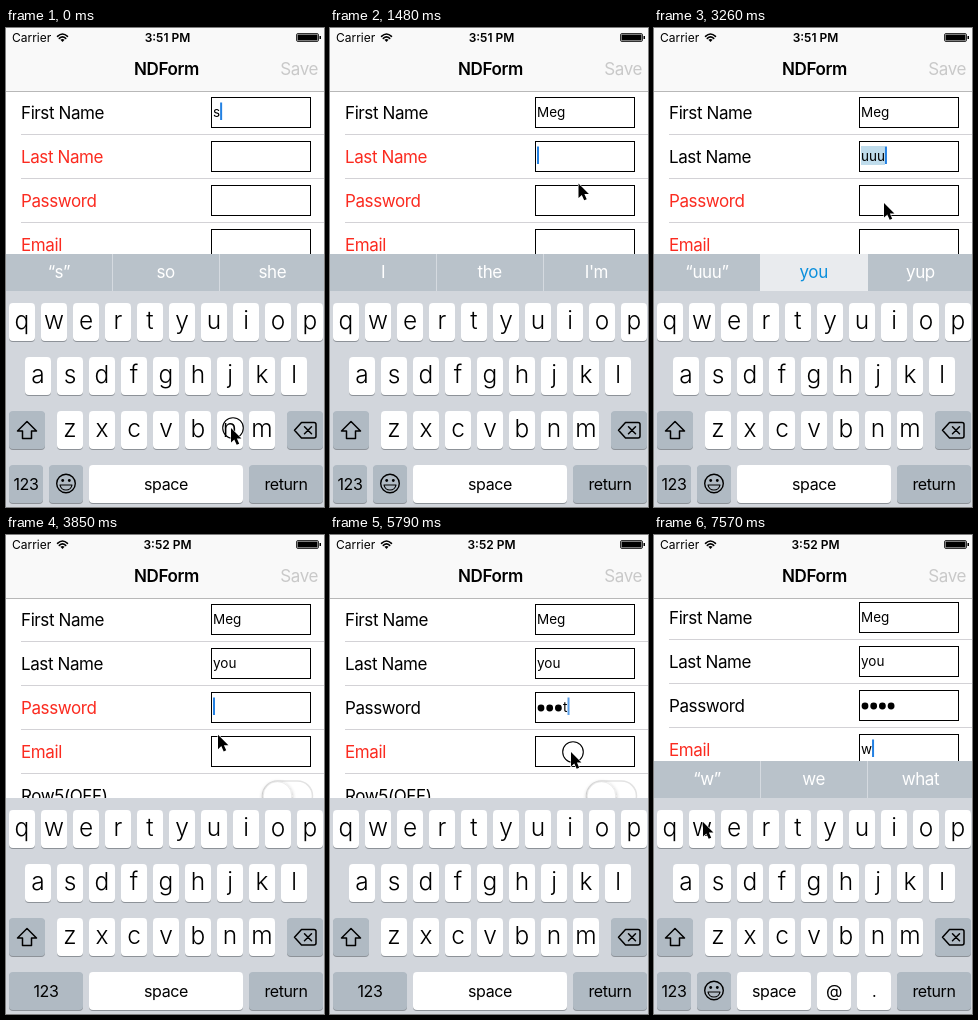
Write an HTML page that moves like this. It is 318x479 px and loops after 8000 ms.

```html
<!DOCTYPE html>
<html lang="en">
<head>
<meta charset="utf-8">
<title>Form demo</title>
<style>
  html, body { margin: 0; width: 100%; height: 100%; overflow: hidden; background: #fff; }
  svg { display: block; width: 318px; height: 479px; }
  text { font-family: Inter, Roboto, sans-serif; font-size: 17px; letter-spacing: -.4px; white-space: pre; }
  .mid { text-anchor: middle; }
  .status { font-size: 12px; letter-spacing: 0; }
  .bold { font-weight: 600; }
  .value { font-size: 13.5px; letter-spacing: 0; }
  .letter { font-size: 24.5px; font-weight: 300; letter-spacing: 0; }
  .big { font-size: 38px; font-weight: 300; letter-spacing: 0; }
  .word { font-size: 16px; }
  .line { fill: none; stroke: #000; stroke-linecap: round; stroke-linejoin: round; }
</style>
</head>
<body>
<svg id="stage" viewBox="0 0 318 479" xmlns="http://www.w3.org/2000/svg">
  <defs>
    <filter id="lift" x="-30%" y="-20%" width="160%" height="150%">
      <feDropShadow dx="0" dy="1.5" stdDeviation="2" flood-color="#000" flood-opacity=".38"/>
    </filter>
  </defs>
  <rect width="318" height="479" fill="#fff"/>
  <g id="table"></g>
  <g id="header"></g>
  <g id="bar"></g>
  <g id="keys"></g>
  <g id="overlay"></g>
</svg>
<script>
const LOOP = 8000, TICK = 148.4, LEAD = 12;   // the screen refreshes once per tick
const ROW = 44, KEY_W = 26, KEY_H = 38, KEYS_TOP = 263;
const LABELS = ['First Name', 'Last Name', 'Password', 'Email'];
const LETTER_ROWS = ['qwertyuiop', 'asdfghjkl', 'zxcvbnm'];
const layer = id => document.getElementById(id);

// [tick, field, text]: the latest entry also owns the focus
const edits = [
  [0, 0, 's'], [1, 0, 'sn'], [3, 0, 'snn'], [9, 0, 'Meg'],
  [9, 1, ''], [16, 1, 'u'], [19, 1, 'uu'], [20, 1, 'uuu'], [24, 1, 'you'],
  [24, 2, ''], [32, 2, 't'], [34, 2, '•t'], [35, 2, '••t'], [36, 2, '•••t'], [40, 2, '••••'],
  [40, 3, ''], [50, 3, 'w']
];
const hints = [
  [0, '“s”', 'so', 'she'], [1, '“sn”', 'an', 'in'], [3, '“snn”', 'Meg', 'annoying'],
  [9, 'I', 'the', "I'm"], [16, '“u”', 'up', 'under'], [19, '“uu”', 'you', 'us'],
  [20, '“uuu”', 'you', 'yup'], [24, 'I', 'the', "I'm"], [50, '“w”', 'we', 'what']
];
const pointerPath = [
  [0, 227, 400], [2, 227, 400], [3, 240, 300], [4, 254, 198], [6, 256, 140], [7, 256, 131],
  [9, 256, 131], [11, 245, 180], [13, 218, 285], [14, 210, 304], [15, 208, 300], [20, 208, 300],
  [21, 222, 225], [22, 232, 175], [23, 236, 172], [25, 236, 172], [28, 170, 255], [29, 150, 278],
  [30, 142, 281], [36, 142, 281], [38, 232, 225], [39, 243, 217], [41, 243, 217],
  [45, 110, 300], [46, 70, 309], [48, 51, 287]
];
const barPath = [[0, 226], [24, 226], [25, 245], [26, 263], [39, 263], [40, 250], [41, 230], [42, 226]];
const layouts = [[0, 'text'], [25, 'password'], [40, 'email']];
const popups = { 2: 'n', 16: 'u', 17: 'u', 19: 'u', 31: 't', 33: 't', 35: 't', 49: 'w', 50: 'w' };
const taps = new Set([0, 8, 23, 39, ...Object.keys(popups).map(Number)]);

const latest = (list, k) => list.filter(e => e[0] <= k).pop();
const within = (k, a, b) => k >= a && k <= b;

function along(path, k) {
  const i = path.findIndex(p => p[0] > k);
  if (i < 0) return path[path.length - 1].slice(1);
  const a = path[i - 1], b = path[i], u = (k - a[0]) / (b[0] - a[0]);
  return a.slice(1).map((v, j) => v + (b[j + 1] - v) * u);
}

const text = (x, y, s, cls = '', fill = '#000') =>
  `<text x="${x}" y="${y}" class="${cls}" fill="${fill}">${s}</text>`;
const rect = (x, y, w, h, fill, more = '') =>
  `<rect x="${x}" y="${y}" width="${w}" height="${h}" fill="${fill}" ${more}/>`;
const circle = (x, y, r, more = '') => `<circle cx="${x}" cy="${y}" r="${r}" ${more}/>`;
const line = (d, width) => `<path class="line" d="${d}" stroke-width="${width}"/>`;

const pen = document.createElement('canvas').getContext('2d');
function textWidth(s) {
  pen.font = '13.5px Inter, Roboto, sans-serif';
  return pen.measureText(s).width;
}

function fieldValue(s, y) {
  const dots = s.split('•').length - 1, rest = s.slice(dots);
  const x = 207 + dots * 8.7;
  let out = '';
  for (let i = 0; i < dots; i++) out += circle(211 + i * 8.7, y + 16, 3.4);
  return { svg: out + text(x, y + 19.5, rest, 'value'), end: x + textWidth(rest) };
}

function drawTable(k) {
  const [since, focus] = latest(edits, k);
  const selected = within(k, 4, 8) || within(k, 21, 23);
  const phase = (k - since) % 7;
  const caretAlpha = phase < 3 ? 1 : phase === 3 ? .75 : 0;
  let out = '';
  LABELS.forEach((label, i) => {
    const edit = latest(edits.filter(e => e[1] === i), k);
    const value = edit ? edit[2] : '';
    const y = 69 + i * ROW;
    const invalid = i === 3 || !value;
    const shown = fieldValue(value, y);
    out += text(15, y + 22, label, '', invalid ? '#fb2b20' : '#000');
    out += rect(205.5, y + .5, 99, 30, '#fff', 'stroke="#000"');
    if (i === focus && selected) out += rect(207, y + 5, shown.end - 207, 19, '#bfdcec');
    out += shown.svg;
    if (i === focus)
      out += rect(shown.end, y + 5.5, 2, 17.5, '#2481e2', `opacity="${selected ? 1 : caretAlpha}"`);
    out += rect(15, y + 37, 303, 1, '#d3d2d6');
  });
  out += text(15, 267, 'Row5(OFF)');
  out += rect(256.5, 246, 50, 30, '#fff', 'rx="15" stroke="#e3e3e3" stroke-width="1.5"');
  out += circle(271.5, 261, 14.3, 'fill="#fff" stroke="#dedede" stroke-width=".7" filter="url(#lift)" opacity=".8"');
  layer('table').innerHTML = out;
  layer('table').setAttribute('transform', `translate(0 ${k >= 41 ? -2 : 0})`);
}

function drawHeader(k) {
  layer('header').innerHTML =
    rect(0, 0, 318, 63, '#f9f9f9') + rect(0, 63, 318, 1, '#b8b8b8') +
    text(6, 13.5, 'Carrier', 'status') +
    line('M51.5 8.3Q56.5 3.7 61.5 8.3M53.3 10.4Q56.5 7.5 59.7 10.4', 1.6) +
    '<path d="M54.4 11.8Q56.5 10 58.6 11.8L56.5 14Z"/>' +
    text(161.5, 13.5, k < 24 ? '3:51 PM' : '3:52 PM', 'status bold mid') +
    rect(290.5, 5.5, 22, 8, 'none', 'rx="1.5" stroke="#000" stroke-width=".8"') +
    rect(291.5, 6.5, 20, 6, '#000') + rect(313.5, 8, 1.5, 3, '#000') +
    text(160.5, 47, 'NDForm', 'bold mid') +
    '<text x="312" y="47" text-anchor="end" fill="#c9c9c9">Save</text>';
}

function drawBar(k) {
  const [top] = along(barPath, k);
  if (top >= KEYS_TOP) return layer('bar').innerHTML = '';
  const chosen = within(k, 4, 8) || within(k, 21, 23);
  let out = rect(0, top, 318, 38, '#b9c2ca');
  out += rect(106, top, 1, 38, '#d5dae0') + rect(213, top, 1, 38, '#d5dae0');
  if (chosen) out += rect(106, top, 108, 38, '#e9ebee');
  latest(hints, k).slice(1).forEach((s, i) => {
    out += text(53 + i * 106.7, top + 23.5, s, 'mid', chosen && i === 1 ? '#0a8fdc' : '#fff');
  });
  layer('bar').innerHTML = out;
}

function keyCap(x, y, w, fill = '#fff') {
  return rect(x, y + 1, w, KEY_H, '#8d9298', 'rx="4"') + rect(x, y, w, KEY_H, fill, 'rx="4"');
}

function keyPlace(letter) {
  const row = LETTER_ROWS.findIndex(r => r.includes(letter));
  return { x: [3, 19, 51][row] + LETTER_ROWS[row].indexOf(letter) * 32, y: 275 + row * 54 };
}

function drawKeys(k) {
  const layout = latest(layouts, k)[1], grey = '#b0bac3';
  const wordKey = (x, w, s, fill, cls = 'word') =>
    keyCap(x, 437, w, fill) + text(x + w / 2, 461.5, s, cls + ' mid');
  let out = rect(0, KEYS_TOP, 318, 479 - KEYS_TOP, '#d2d6dc');
  for (const c of LETTER_ROWS.join('')) {
    const { x, y } = keyPlace(c);
    out += keyCap(x, y, KEY_W) + text(x + 13, y + 25.5, c, 'letter mid');
  }
  out += keyCap(3, 383, 36, grey) +
    line('M21 393.5L30.5 403H25.5V410.5H16.5V403H11.5Z', 1.5);
  out += keyCap(281, 383, 36, grey) +
    line('M295.5 394.5H308Q310 394.5 310 396.5V408Q310 410 308 410H295.5L288.5 402.2ZM298.5 398.7L305.5 405.7M305.5 398.7L298.5 405.7', 1.5);
  out += wordKey(3, layout === 'password' ? 74 : 34, '123', grey);
  if (layout !== 'password')
    out += keyCap(43, 437, 34, grey) +
      circle(60, 455.5, 9.3, 'class="line" stroke-width="1.4"') +
      circle(56.7, 452.5, 1.4) + circle(63.3, 452.5, 1.4) +
      line('M54 457H66Q65 462 60 462T54 457Z', 1.2);
  if (layout === 'email')
    out += wordKey(83, 74, 'space', '#fff') + wordKey(163, 34, '@', '#fff', '') + wordKey(203, 34, '.', '#fff');
  else
    out += wordKey(83, 154, 'space', '#fff');
  layer('keys').innerHTML = out + wordKey(243, 74, 'return', grey);
}

function popup(letter) {
  const { x, y } = keyPlace(letter);
  const shape = 'M-16-64H16Q26-64 26-54V-20C26-6 13-6 13 6V34Q13 38 9 38H-9Q-13 38-13 34V6C-13-6-26-6-26-20V-54Q-26-64-16-64Z';
  return `<g transform="translate(${x + 13} ${y})"><path d="${shape}" fill="#fff" filter="url(#lift)"/>` +
    text(0, -20.5, letter, 'big mid') + '</g>';
}

function drawOverlay(k) {
  const [x, y] = along(pointerPath, k);
  let out = popups[k] ? popup(popups[k]) : '';
  if (taps.has(k)) out += circle(x, y, 10.3, 'class="line" stroke-width="1.1"');
  out += `<path transform="translate(${x - 2} ${y})" d="M0 0V14.5L3.3 11.4L5.7 16.8L8.2 15.7L5.9 10.5H10.4Z"
    stroke="#fff" stroke-width="1.1" paint-order="stroke"/>`;
  layer('overlay').innerHTML = out;
}

let shownTick = -1;
function render(ms) {
  const k = Math.min(51, Math.floor((ms % LOOP + LEAD) / TICK));
  if (k === shownTick) return;
  shownTick = k;
  [drawTable, drawHeader, drawBar, drawKeys, drawOverlay].forEach(draw => draw(k));
}

const start = performance.now();
function loop() {
  render(performance.now() - start);
  requestAnimationFrame(loop);
}
loop();
</script>
</body>
</html>
```
